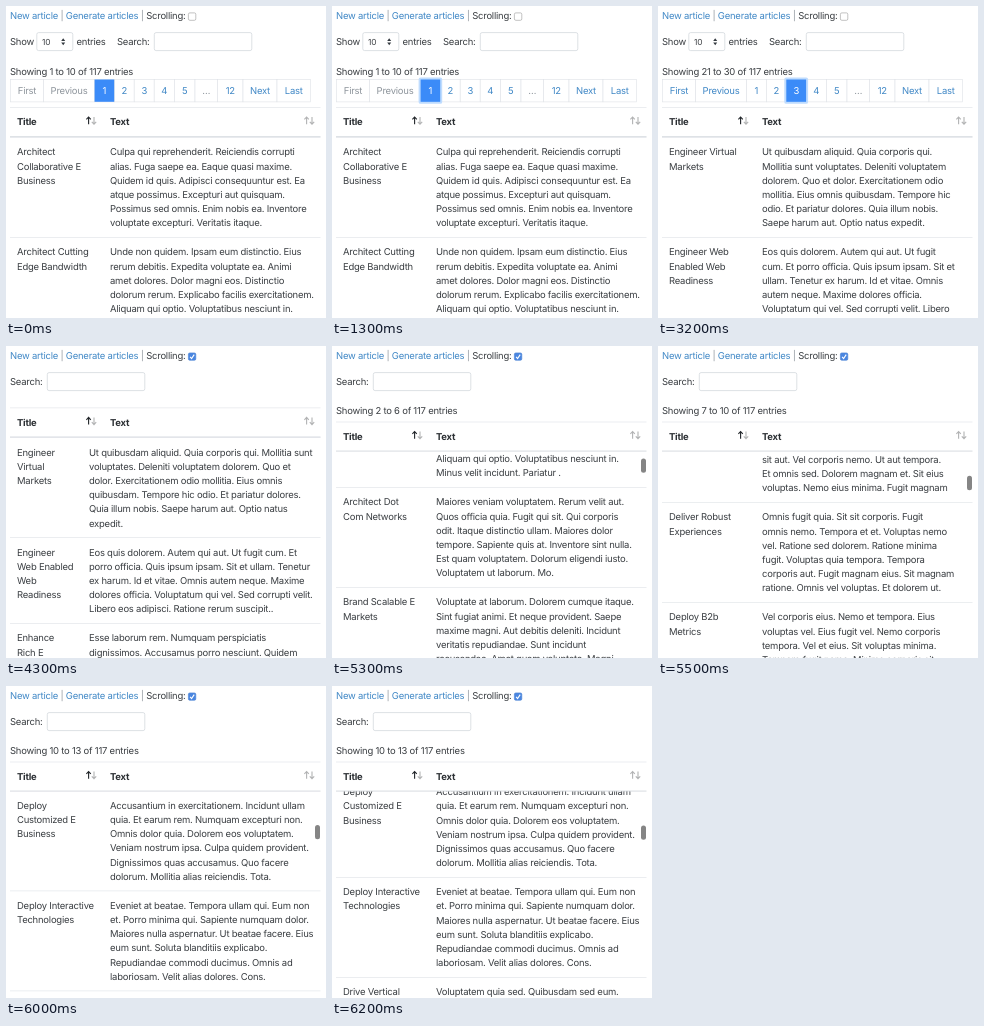
Write an HTML page that moves like this. It is 320 by 312 pixels and loops after 6600 ms.

```html
<!DOCTYPE html>
<html lang="en">
<head>
<meta charset="utf-8">
<title>Articles</title>
<style>
html, body { margin: 0; width: 100%; height: 100%; overflow: hidden; background: #fff; }
svg { display: block; }
text {
  font: 9.47px Inter, "Open Sans", sans-serif;
  letter-spacing: -.024em;
  fill: #3a3e42;
  white-space: pre;
  text-rendering: geometricPrecision;
}
.link { fill: #4088c6; }
.off { fill: #8e959c; }
.on { fill: #fff; }
.bold { font-weight: 700; fill: #2a2e32; }
.small { font-size: 8.3px; }
.mid { text-anchor: middle; }
</style>
</head>
<body>
<svg id="stage" width="320" height="312" viewBox="0 0 320 312"></svg>
<script>
const LOOP = 6600, LINE = 14.2, BORDER = '#dee2e6';
const stage = document.getElementById('stage');

function add(parent, tag, attrs = {}) {
  const el = document.createElementNS('http://www.w3.org/2000/svg', tag);
  for (const k in attrs) el.setAttribute(k, attrs[k]);
  return parent.appendChild(el);
}
const rect = (g, x, y, width, height, fill, more) =>
  add(g, 'rect', { x, y, width, height, fill, ...more });
function text(g, x, y, str, cls = '') {
  const el = add(g, 'text', { x, y, class: cls });
  el.textContent = str;
  return el;
}
const show = (el, on) => el.setAttribute('visibility', on ? 'inherit' : 'hidden');

// Rows: title lines and text lines separated by "|"
const first = [
  ['Architect|Collaborative E|Business', 'Culpa qui reprehenderit. Reiciendis corrupti|alias. Fuga saepe ea. Eaque quasi maxime.|Quidem id quis. Adipisci consequuntur est. Ea|atque possimus. Excepturi aut quisquam.|Possimus sed omnis. Enim nobis ea. Inventore|voluptate excepturi. Veritatis itaque.'],
  ['Architect Cutting|Edge Bandwidth', 'Unde non quidem. Ipsam eum distinctio. Eius|rerum debitis. Expedita voluptate ea. Animi|amet dolores. Dolor magni eos. Distinctio|dolorum rerum. Explicabo facilis exercitationem.|Aliquam qui optio. Voluptatibus nesciunt in.|Minus velit incidunt. Pariatur .']
];
const second = [
  ['Deploy Interactive|Technologies', 'Eveniet at beatae. Tempora ullam qui. Eum non|et. Porro minima qui. Sapiente numquam dolor.|Maiores nulla aspernatur. Ut beatae facere. Eius|eum sunt. Soluta blanditiis explicabo.|Repudiandae commodi ducimus. Omnis ad|laboriosam. Velit alias dolores. Cons.'],
  ['Drive Vertical|Initiatives', 'Voluptatem quia sed. Quibusdam sed eum.|Ullam hic non. Accusantium praesentium|quibusdam. Necessitatibus aliquam molestiae.|Consequuntur sint praesentium. Incidunt facere|illum. Cupiditate totam facere. Ut dicta|dolorem.']
];
const third = [
  ['Engineer Virtual|Markets', 'Ut quibusdam aliquid. Quia corporis qui.|Mollitia sunt voluptates. Deleniti voluptatem|dolorem. Quo et dolor. Exercitationem odio|mollitia. Eius omnis quibusdam. Tempore hic|odio. Et pariatur dolores. Quia illum nobis.|Saepe harum aut. Optio natus expedit.'],
  ['Engineer Web|Enabled Web|Readiness', 'Eos quis dolorem. Autem qui aut. Ut fugit|cum. Et porro officia. Quis ipsum ipsam. Sit et|ullam. Tenetur ex harum. Id et vitae. Omnis|autem neque. Maxime dolores officia.|Voluptatum qui vel. Sed corrupti velit. Libero|eos adipisci. Ratione rerum suscipit..']
];
const wide = [
  ['Engineer|Virtual|Markets', 'Ut quibusdam aliquid. Quia corporis qui. Mollitia sunt|voluptates. Deleniti voluptatem dolorem. Quo et|dolor. Exercitationem odio mollitia. Eius omnis|quibusdam. Tempore hic odio. Et pariatur dolores.|Quia illum nobis. Saepe harum aut. Optio natus|expedit.'],
  ['Engineer|Web Enabled|Web|Readiness', 'Eos quis dolorem. Autem qui aut. Ut fugit cum. Et|porro officia. Quis ipsum ipsam. Sit et ullam. Tenetur|ex harum. Id et vitae. Omnis autem neque. Maxime|dolores officia. Voluptatum qui vel. Sed corrupti velit.|Libero eos adipisci. Ratione rerum suscipit..'],
  ['Enhance|Rich E', 'Esse laborum rem. Numquam perspiciatis|dignissimos. Accusamus porro nesciunt. Quidem']
];
const list = [
  ...first,
  ['Architect Dot|Com Networks', 'Maiores veniam voluptatem. Rerum velit aut.|Quos officia quia. Fugit qui sit. Qui corporis|odit. Itaque distinctio ullam. Maiores dolor|tempore. Sapiente quis at. Inventore sint nulla.|Est quam voluptatem. Dolorum eligendi iusto.|Voluptatem ut laborum. Mo.'],
  ['Brand Scalable E|Markets', 'Voluptate at laborum. Dolorem cumque itaque.|Sint fugiat animi. Et neque provident. Saepe|maxime magni. Aut debitis deleniti. Incidunt|veritatis repudiandae. Sunt incidunt|recusandae. Amet quam voluptate. Magni|dolor aut. Quia nemo.'],
  ['Brand Viral|Platforms', lorem(1)],
  ['Cultivate Global|Channels', lorem(2)],
  ['Cultivate Web|Enabled Systems', lorem(3)],
  ['Deliver Robust|Experiences', lorem(4)],
  ['Deploy B2b|Metrics', lorem(5, 4) + '|aliquam consequatur. Modi qui sint. Corrupti|consequatur sit. Est tempor.'],
  ['Deploy|Customized E|Business', 'Accusantium in exercitationem. Incidunt ullam|quia. Et earum rem. Numquam excepturi non.|Omnis dolor quia. Dolorem eos voluptatem.|Veniam nostrum ipsa. Culpa quidem provident.|Dignissimos quas accusamus. Quo facere|dolorum. Mollitia alias reiciendis. Tota.'],
  ...second
];

// Seeded filler: three-word sentences wrapped to the column
function lorem(seed, count = 6) {
  const words = 'quia dolorem sit voluptas aut nemo magnam et eius ratione omnis vel corporis sed tempora ut fugit minima'.split(' ');
  const lines = [''];
  for (let i = 0; ; i++) {
    seed = (seed * 7919 + 104729) % 233280;
    let w = words[Math.floor(seed / 233280 * words.length)];
    if (i % 3 === 0) w = w[0].toUpperCase() + w.slice(1);
    if (i % 3 === 2) w += '.';
    const last = lines.length - 1;
    if (lines[last].length + w.length < 43) lines[last] += (lines[last] && ' ') + w;
    else if (lines.length === count) return lines.join('|');
    else lines.push(w);
  }
}

function topBar(g, checked) {
  const t = add(g, 'text', { x: 4, y: 13 });
  const bar = '<tspan class="off"> | </tspan>';
  t.innerHTML = ['<tspan class="link">New article</tspan>', '<tspan class="link">Generate articles</tspan>', 'Scrolling:'].join(bar);
  rect(g, 182.4, 6.9, 7.4, 7.4, checked ? '#4a86e0' : '#fff',
    { rx: 1.4, stroke: checked ? '#4a82d4' : '#999', 'stroke-width': .6 });
  if (checked) add(g, 'path', { d: 'M184.1 10.8l1.5 1.8 2.6-4', fill: 'none', stroke: '#fff', 'stroke-width': 1.1 });
}

function field(g, x, w) {
  rect(g, x + .3, 26.6, w, 18, '#fff', { rx: 1.8, stroke: '#ced4da', 'stroke-width': .7 });
}

function arrow(g, x, y, dir, alpha) {
  add(g, 'path', {
    d: `M${x} ${y + 3.6 * dir}V${y - 3.4 * dir}m-2.2 ${2.2 * dir}l2.2 ${-2.4 * dir} 2.2 ${2.4 * dir}`,
    fill: 'none', stroke: '#212529', 'stroke-width': 1.1, opacity: alpha
  });
}

function head(g, top) {
  rect(g, 4, top, 310.5, .6, BORDER);
  rect(g, 4, top + 28.8, 310.5, 1.2, BORDER);
  text(g, 11, top + 18, 'Title', 'bold');
  text(g, 104, top + 18, 'Text', 'bold');
  arrow(g, 82.6, top + 13.4, 1, 1);
  arrow(g, 88, top + 13.4, -1, .35);
  arrow(g, 300.6, top + 13.4, 1, .35);
  arrow(g, 306, top + 13.4, -1, .35);
}

function rows(g, top, data, textX = 104) {
  for (const [title, body] of data) {
    rect(g, 4, top, 310.5, .6, BORDER);
    const cells = [[11, title.split('|')], [textX, body.split('|')]];
    for (const [x, lines] of cells)
      lines.forEach((s, i) => text(g, x, top + 18.1 + i * LINE, s));
    top += .6 + LINE * (1 + Math.max(...cells.map(c => c[1].length)));
  }
}

const labels = ['First', 'Previous', '1', '2', '3', '4', '5', '…', '12', 'Next', 'Last'];
const edges = [4.5, 37.5, 88.5, 108.3, 128.2, 148.2, 168.4, 189, 211.5, 237, 271, 304.5];

function pager(g, page) {
  const top = 73.4, h = 22.5, ring = add(g, 'g'), hover = add(g, 'g');
  const box = (p, i, fill, stroke, grow = 0) =>
    rect(p, edges[i] - grow, top - grow, edges[i + 1] - edges[i] + 2 * grow, h + 2 * grow, fill,
      { stroke, 'stroke-width': .6, rx: Math.max(0, grow) });
  labels.forEach((s, i) => box(g, i, '#fff', BORDER));
  g.append(hover, ring);
  box(hover, page + 2, '#e9ecef', BORDER);
  box(ring, page + 1, '#bfdcfe', 'none', 1.9);
  box(g, page + 1, '#3b8bf8', 'none', -.1);
  labels.forEach((s, i) => {
    const off = i === 7 || (page === 1 && i < 2);
    const cls = i === page + 1 ? 'on' : off ? 'off' : 'link';
    text(g, (edges[i] + edges[i + 1]) / 2, top + 14.8, s, 'mid ' + cls);
  });
  return { ring, hover };
}

function pageView(page, data) {
  const g = add(stage, 'g');
  topBar(g, false);
  text(g, 4, 38.8, 'Show');
  field(g, 30.5, 36);
  text(g, 36, 39, '10', 'small');
  add(g, 'path', { d: 'M55.2 34.9l2-2.7 2 2.7zM55.2 36.5l2 2.7 2-2.7z', fill: '#343a40' });
  text(g, 70.5, 38.8, 'entries');
  text(g, 111, 38.8, 'Search:');
  field(g, 148, 97.5);
  text(g, 4, 69.2, `Showing ${page * 10 - 9} to ${page * 10} of 117 entries`);
  const marks = pager(g, page);
  head(g, 101.2);
  rows(g, 131.2, data);
  return { g, ...marks };
}

function scrollBase() {
  const g = add(stage, 'g');
  topBar(g, true);
  text(g, 4, 38.8, 'Search:');
  field(g, 41, 97.5);
  return g;
}

const pages = [first, second, third].map((d, i) => pageView(i + 1, d));

const loose = scrollBase();
head(loose, 61.6);
rows(loose, 91.4, wide, 83);

const scroller = scrollBase();
const info = text(scroller, 4, 68.4, '');
head(scroller, 75.7);
const view = add(scroller, 'svg', { x: 0, y: 105.4, width: 320, height: 206.6 });
const body = add(view, 'g');
rows(body, 0, list);
const thumb = rect(scroller, 309, 0, 5, 14.4, '#858585', { rx: 2.5 });

// Momentum scroll, sampled every 100 ms
function scrollAt(t) {
  if (t < 5300) return 0;
  const n = Math.min(9, Math.floor((t - 5300) / 100));
  return 922 - 758 * .6 ** n;
}

function draw(t) {
  const page = t < 1700 ? 0 : t < 2700 ? 1 : t < 4300 ? 2 : -1;
  pages.forEach(({ g, ring, hover }, i) => {
    show(g, i === page);
    show(ring, t >= 1300);
    show(hover, i === 1 && t >= 2200);
  });
  show(loose, t >= 4300 && t < 4400);
  show(scroller, t >= 4400);
  const s = scrollAt(t);
  body.setAttribute('transform', `translate(0 ${-s})`);
  thumb.setAttribute('y', 106.5 + s * .036);
  show(thumb, t >= 5300);
  info.textContent = `Showing ${Math.floor(s / 100) + 1} to ${Math.round(s / 100 + 4)} of 117 entries`;
}

const start = performance.now();
function tick() {
  draw((performance.now() - start) % LOOP);
  requestAnimationFrame(tick);
}
tick();
</script>
</body>
</html>
```
